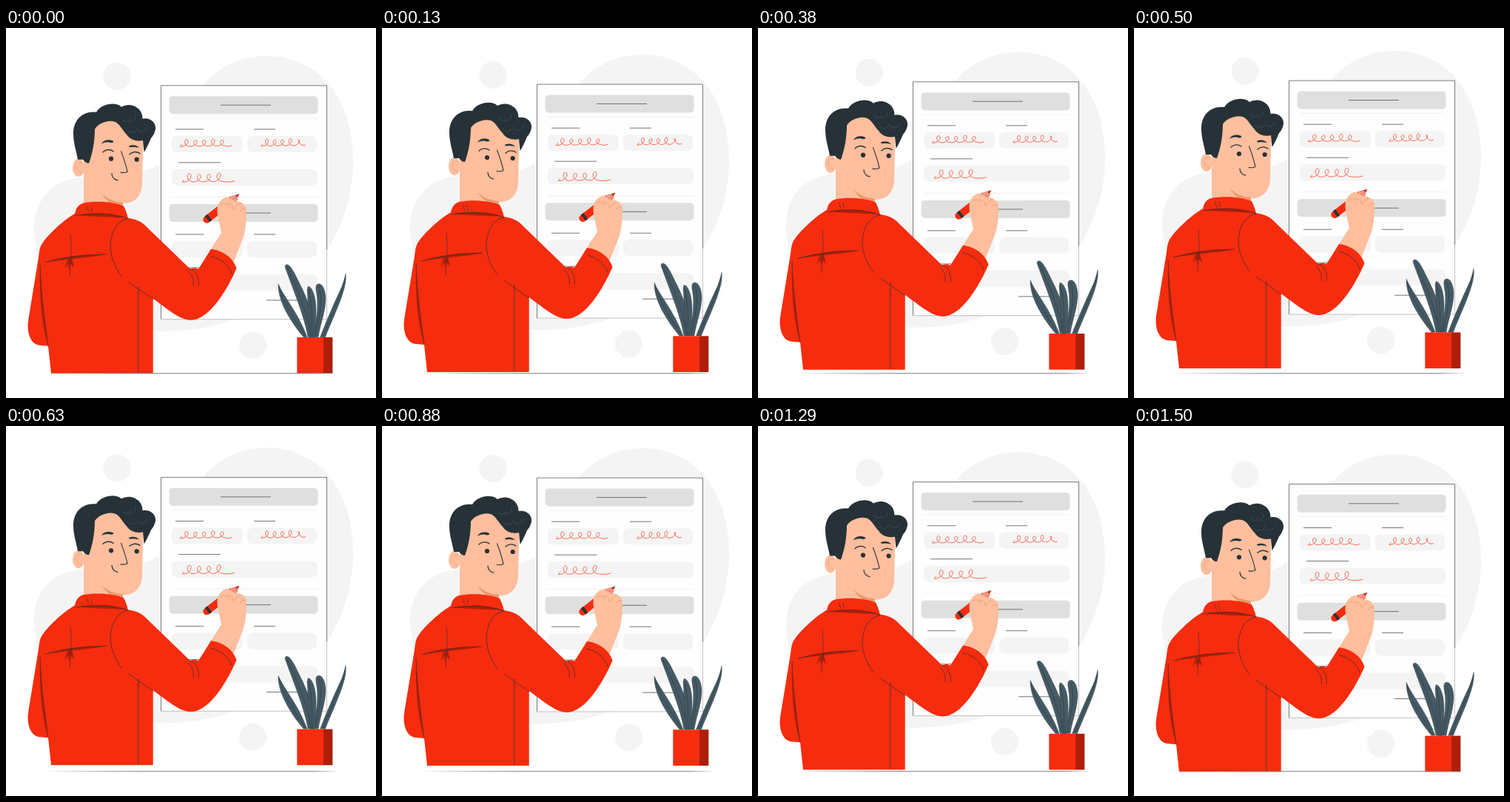
These frames come from a looping animation (500 px wide and 500 px high, 1540 ms). An HTML page with a canvas:

```html
<!DOCTYPE html>
<html lang="en">
<head>
<meta charset="utf-8">
<title>Filling in a form</title>
<style>
  html, body { margin: 0; width: 100%; height: 100%; overflow: hidden; background: #fff; }
  canvas { display: block; width: 500px; height: 500px; }
</style>
</head>
<body>
<canvas id="stage"></canvas>
<script>
const LOOP = 1540, FPS = 24, RISE = 10;
const RED = '#f62c0e', DARK_RED = '#ad1f0a', INK = '#263238', SKIN = '#ffbe9d',
      SHADE = '#eb996e', LEAF = '#455a64', PALE = '#f4f4f4', GREY = '#dfdfdf';

const canvas = document.getElementById('stage');
const ctx = canvas.getContext('2d');
const ratio = window.devicePixelRatio || 1;
canvas.width = canvas.height = 500 * ratio;

function fill(d, color) {
  ctx.fillStyle = color;
  ctx.fill(new Path2D(d));
}

function stroke(d, color = INK, width = 0.8) {
  ctx.strokeStyle = color;
  ctx.lineWidth = width;
  ctx.stroke(new Path2D(d));
}

function dot(x, y, rx, color, ry = rx) {
  ctx.fillStyle = color;
  ctx.beginPath();
  ctx.ellipse(x, y, rx, ry, 0, 0, Math.PI * 2);
  ctx.fill();
}

function bar(x, y, w, h, color, radius = 5) {
  ctx.fillStyle = color;
  ctx.beginPath();
  ctx.roundRect(x, y, w, h, radius);
  ctx.fill();
}

function rule(x1, x2, y, color = '#4c565b', width = 0.8) {
  stroke(`M${x1} ${y}H${x2}`, color, width);
}

// Handwriting: a looping, slightly slanted trochoid that ends in a flat tail.
function scribble(x, y, pitch, loops, height, tail) {
  ctx.beginPath();
  ctx.moveTo(x + 2, y - 3);
  ctx.quadraticCurveTo(x - 3, y + 1, x + 1, y);
  const end = loops * Math.PI * 2;
  for (let a = 0; a <= end; a += 0.15) {
    const lift = (1 - Math.cos(a)) / 2;
    const grow = 0.9 + 0.1 * Math.sin(a * 0.37);
    ctx.lineTo(x + 1 + pitch * (a / (Math.PI * 2) + 0.4 * Math.sin(a) + 0.1 * lift),
               y - height * grow * lift - a * 0.03);
  }
  const endX = x + pitch * loops;
  ctx.quadraticCurveTo(endX + tail * 0.4, y + 1, endX + tail, y - 1.5);
  ctx.strokeStyle = RED;
  ctx.lineWidth = 0.7;
  ctx.stroke();
}

function drawBackdrop() {
  fill('M352 38C318 38 287 52 266 78C238 112 235 166 203 187C168 206 122 196 90 204C55 212 37 240 38 275C40 335 100 402 200 410C260 412 310 398 350 376C400 350 423 322 435 298C458 262 469 222 469 180C469 98 425 38 352 38Z', PALE);
  dot(150, 65.5, 18.5, PALE);
  dot(333.5, 429, 18.5, PALE);
}

function drawHeader(top) {
  bar(220.5, top, 201, 24, GREY);
  rule(290, 358, top + 12);
}

function drawFields(top) {
  rule(229, 267, top);
  rule(335, 364, top);
  bar(224, top + 9, 96, 22, PALE, 7);
  bar(326, top + 9, 94, 22, PALE, 7);
  rule(233, 290, top + 45);
  bar(224, top + 54, 197, 22, PALE, 7);
}

function drawSheet() {
  ctx.fillStyle = '#fefefe';
  ctx.fillRect(209.5, 78.1, 224, 316);
  stroke('M209.5 394V78.1H433.5V300', '#555d61', 0.8);
  stroke('M209.5 394H433.5V300', '#a5a9ab', 0.7);
  drawHeader(92.5);
  drawFields(137.2);
  drawHeader(238.3);
  drawFields(279.2);
  rule(224, 421, 122.4, '#ededed');
  rule(224, 421, 228.6, '#ededed');
  rule(352, 408, 368.2);
  scribble(236, 160.5, 12, 5, 9.5, 9);
  scribble(345.5, 160, 10.5, 4.5, 9.5, 12);
  scribble(239, 208.5, 13.3, 4, 11.5, 17);
}

function drawPencil() {
  ctx.save();
  ctx.translate(315, 225);
  ctx.rotate(Math.atan2(35, -45));
  fill('M0 0L13 -5V5Z', SKIN);
  fill('M0 0L5 -2V2Z', '#b8312a');
  fill('M12 -5H55C62 -5 62 5 55 5H12Z', RED);
  fill('M50.5 -5H54.5V5H50.5Z', INK);
  stroke('M0 0L13 -5M0 0L13 5', '#b8312a', 0.6);
  ctx.restore();
}

function drawHand() {
  drawPencil();
  fill('M274 304L291 277C288 262 284 250 286 241C288 234 293 230 298 229C303 228 306 233 311 234C319 235 325 239 325 247C325 266 323 280 318 290L307 318Z', SKIN);
  fill('M303 231L310 227L314 231L311 235Z', '#f58f7c');
  stroke('M290 240C295 234 300 240 302 243M299 238C304 237 307 241 308 246M307 246C309 242 312 240 317 237M316 248C318 245 321 243 324 244', SHADE, 0.8);
}

function drawPlant() {
  const leaves = [
    ['M368 346C375 363 396 387 407 418H402C384 396 367 369 368 346Z', 'M369 350C376 375 391 395 405 418'],
    ['M378 320.5C384 317 391 334 399 350C409 370 416 391 417 418H408C403 389 388 354 378 326C376.500 323 377 321 378 320.5Z', 'M380 324C393 352 408 386 412 418'],
    ['M408 349.5C413 349 419 362 419 380C419 395 418 407 416 418H411C411 396 408 375 407 354Z', 'M409 354C414 374 414 398 413 418'],
    ['M420 347C426 343 431 352 432 363C433 380 425 399 422 418H414.500C419 397 423 376 419.500 358C418.500 352 418.500 349 420 347Z', 'M423 350C430 374 420 398 418 418'],
    ['M459 332C462 352 444 386 431.500 418H424.500C434 394 442 375 451 356C455 348 457 341 459 332Z', 'M458 339C453 361 439 389 428 418']
  ];
  for (const [shape, vein] of leaves) {
    fill(shape, LEAF);
    stroke(shape, INK, 0.35);
    stroke(vein, INK, 0.5);
  }
  ctx.fillStyle = RED;
  ctx.fillRect(393.3, 418.3, 36, 48.7);
  ctx.fillStyle = DARK_RED;
  ctx.fillRect(429, 418.3, 12.3, 48.7);
}

function drawHead() {
  dot(98, 189, 8, SKIN, 12);
  stroke('M103 183C98 180 94 184 95 189C96 193 99 195 102 196', SHADE, 0.7);
  fill('M112 150L105 180V245H158V237C173 238 183 228 184 212L185.500 150C180 122 150 112 118 130Z', SKIN);
  fill('M130 224C137 232 147 235 158 236V243C146 241 135 235 130 224Z', SHADE);
  fill('M112 183C108 183 106 180 104 178H97C95 166 91 156 91 143C91 125 103 112 122 114C128 103 148 99 156 107C168 100 185 108 184.500 123C196 121 203 129 202 137C201 142 199 146 196 149C193 156 190 163 186.500 168L185 152C178 154 168 152 163 144C157 138 154 130 147 127C137 124 124 130 120 137C120 153 117 170 112 183Z', INK);
  stroke('M157 122C158 128 166 129 168 123M166 127C171 128 176 124 175 118M163 138C168 144 176 141 177 135M178 138C182 142 190 140 191 134', LEAF, 0.6);

  fill('M129 156.500C132 151 139 150.500 145 153C146 155 143 156 140 155C136 154 133 155 129 156.500Z', INK);
  fill('M166 160C170 157.500 176 158 180 162C177 162 175 161 172 161C169 161.500 166 162 166 160Z', INK);
  ctx.lineCap = 'round';
  stroke('M131 168C135 164 141 164 145 167M167 171C171 167 177 167 181 170', INK, 1.4);
  stroke('M155.500 167C159 176 162 185 164 194.500C161 196 158 196 155 195.500', INK, 1.1);
  stroke('M143 197C143 202 147 206 151 206', INK, 1.2);
  ctx.lineCap = 'butt';
  dot(142, 177, 3.1, INK);
  dot(176.7, 178, 3.1, INK);
}

function drawBody() {
  fill('M95 250C78 259 55 281 48 293C45 298 45 304 44 310L30 396C28 412 33 428 46 429L57 430L61 467H198.700V366C216 378 234 395 250 395C275 395 300 352 311.500 325C308 313 295 301 277 299L260 326C256 324 253 324 249 326L190 269C183 261 175 259 165 257Z', RED);
  fill('M93 254C93 246 97 239 104 237C124 233 148 236 159 241C162 247 164 252 165 258C140 250 114 252 93 254Z', RED);
  fill('M95 253.500C115 249 145 250 164 257C143 256 118 255 95 253.500Z', DARK_RED);
  stroke('M93 254C115 250 144 250 165 258M110 241C110 245 111 248 113 250M115 241C115 245 116 248 117 249', INK, 0.6);

  // Back and sleeve folds
  fill('M53 317C75 309 105 306 136 306C112 311 84 312 53 317Z', DARK_RED);
  fill('M84 311L79 325L84 319L85 327L87 319L92 324L89 311Z', DARK_RED);
  stroke('M53 317C80 310 108 306 136 306M87 279C89 300 87 318 86 336', INK, 0.6);
  fill('M46 320C47 357 52 394 57 430C47 398 45 357 46 320Z', DARK_RED);
  stroke('M46 320C47 357 52 394 57 430', INK, 0.6);

  stroke('M165 258C148 261 141 279 141 297C142 314 150 327 156 336M165 343C177 352 188 359 199 367M179 349V466', INK, 0.7);
  stroke('M247 326C256 325 262 338 260 349M246 329C252 334 254 341 253 348M277 309C290 312 302 321 305 333', INK, 0.7);
}

function drawGround() {
  fill('M50 466.700L199 466.300H410L450 466.700L415 467.200H150Z', '#747c80');
}

// The whole scene floats up and down linearly; only the ground stays put.
function floatOffset(ms) {
  const step = Math.floor((Math.floor(ms / 10) + 0.5) * FPS / 100 - 1e-6);
  const half = 18, phase = 0.6;
  return -RISE * (1 - Math.abs(1 - (Math.max(step, 0) + phase) / half));
}

function draw(ms) {
  ctx.setTransform(ratio, 0, 0, ratio, 0, 0);
  ctx.fillStyle = '#fff';
  ctx.fillRect(0, 0, 500, 500);
  ctx.translate(0, floatOffset(ms));
  drawBackdrop();
  drawSheet();
  drawHand();
  drawHead();
  drawBody();
  drawPlant();
  ctx.setTransform(ratio, 0, 0, ratio, 0, 0);
  drawGround();
}

const start = performance.now();
function tick() {
  draw((performance.now() - start) % LOOP);
  requestAnimationFrame(tick);
}
tick();
</script>
</body>
</html>
```
